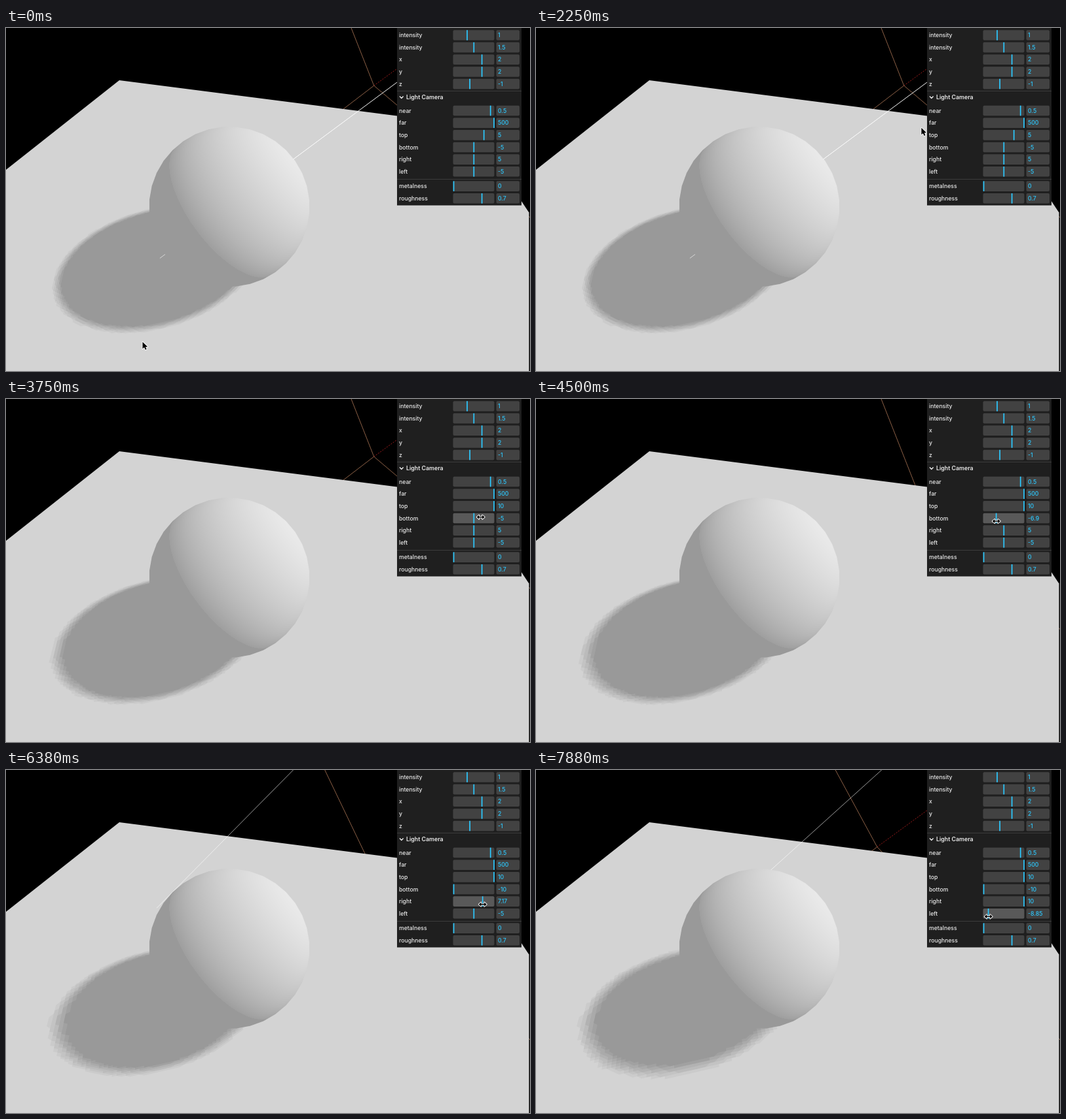
Animation, 800 px wide and 525 px high, one loop 8 s. Source, as an HTML page with a canvas:

```html
<!DOCTYPE html>
<html lang="en">
<head>
<meta charset="utf-8">
<title>Light camera settings</title>
<style>
html, body { margin: 0; width: 100%; height: 100%; overflow: hidden; background: #000; }
canvas { display: block; }
</style>
</head>
<body>
<canvas id="stage" width="800" height="525"></canvas>
<script>
const ctx = document.getElementById('stage').getContext('2d');
const LOOP = 8000, STEP = 125;

// View space: sphere of radius .5 at the origin, camera on +z.
const CX = 341, CY = 273.5, FOCAL = 380, CAM = 1.63, RADIUS = .5, OUTLINE = 122.5;
const light = [.726, .540, .427], right = [-.2, .766, -.609], up = [-.655, .350, .670];
const LIGHT_RISE = .667, UP_RISE = .742; // world heights of the light and up axes
const NEAR = 2.45, LIGHT_DISTANCE = 3, FAR = 500;

const dot = (a, b) => a.reduce((sum, v, i) => sum + v * b[i], 0);
const mix = (a, b, k) => a + (b - a) * k;
const inLight = (r, u, n) => light.map((l, i) => l * n + right[i] * r + up[i] * u);
const project = ([x, y, z]) => {
  const s = FOCAL / (CAM - z);
  return [CX + x * s, CY - y * s];
};
// Distance along the light axis at which the ray (r, u) meets the plane.
const ground = u => -(UP_RISE * u + RADIUS) / LIGHT_RISE;

const settings = [
  ['intensity', 0, 3, 1], ['intensity', 0, 3, 1.5],
  ['x', -5, 5, 2], ['y', -5, 5, 2], ['z', -5, 5, -1],
  ['near', -10, 1.5, .5], ['far', 0, 500, 500], ['top', -10, 10, 5],
  ['bottom', -10, 0, -5], ['right', 0, 10, 5], ['left', -10, 0, -5],
  ['metalness', 0, 1, 0], ['roughness', 0, 1, .7]
];
const rows = settings.map(([label, min, max, value], i) => ({
  label, min, max, value,
  y: 11 + 18.65 * i + (i > 4 ? 22.3 : 0) + (i > 10 ? 3.7 : 0)
}));
const rowOf = label => rows.find(row => row.label === label);
const sliderX = (row, value) => 682.7 + (value - row.min) / (row.max - row.min) * 61.5;

// Each drag eases its value by k ** bend; swing bows the approach to the left.
const drags = [
  { label: 'near', start: 875, end: 1750, to: .5, bend: 1, swing: 0 },
  { label: 'top', start: 2625, end: 3500, to: 10, bend: .75, swing: 150 },
  { label: 'bottom', start: 3875, end: 5000, to: -10, bend: 1.65, swing: 0 },
  { label: 'right', start: 5625, end: 6875, to: 10, bend: 1.63, swing: 35 },
  { label: 'left', start: 7250, end: 7875, to: -8.85, bend: 1, swing: 0 }
];

function valueAt(label, t) {
  const from = rowOf(label).value, d = drags.find(d => d.label === label);
  const k = Math.min(1, Math.max(0, (t - d.start) / (d.end - d.start)));
  return mix(from, d.to, k ** d.bend);
}

function pointerAt(t) {
  let px = 208, py = 480, leave = 125;
  for (const d of drags) {
    const row = rowOf(d.label), y = row.y + 4.5;
    const x = time => sliderX(row, valueAt(d.label, time)) + 1;
    if (t < d.start) {
      const k = Math.max(0, (t - leave) / (d.start - leave));
      return [mix(px, x(d.start), k) - d.swing * Math.sin(Math.PI * k), mix(py, y, k)];
    }
    if (t <= d.end) return [x(t), y];
    [px, py, leave] = [x(d.end), y, d.end];
  }
  return [px, py];
}

function trace(points) {
  ctx.beginPath();
  points.forEach(([x, y]) => ctx.lineTo(x, y));
}
function fill(points, color) {
  trace(points);
  ctx.closePath();
  ctx.fillStyle = color;
  ctx.fill();
}
function stroke(points, color, width = 1, dash = []) {
  trace(points);
  ctx.setLineDash(dash);
  ctx.strokeStyle = color;
  ctx.lineWidth = width;
  ctx.stroke();
  ctx.setLineDash([]);
}
function box(x, y, w, h, color) {
  ctx.beginPath();
  ctx.roundRect(x, y, w, h, 2);
  ctx.fillStyle = color;
  ctx.fill();
}
// Line in view space, clipped in front of the camera.
function line3d(a, b, color, dash) {
  const limit = CAM - .1;
  if (a[2] > limit && b[2] > limit) return;
  const clip = (p, q) => p[2] <= limit ? p :
    p.map((v, i) => mix(v, q[i], (p[2] - limit) / (p[2] - q[2])));
  stroke([project(clip(a, b)), project(clip(b, a))], color, 1, dash);
}

// Diffuse shading of the sphere, computed once.
const SIZE = 250, ballX = Math.round(CX - SIZE / 2), ballY = Math.round(CY - SIZE / 2);
function shadeBall() {
  const ball = document.createElement('canvas');
  ball.width = ball.height = SIZE;
  const b = ball.getContext('2d'), img = b.createImageData(SIZE, SIZE);
  for (let j = 0; j < SIZE; j++) for (let i = 0; i < SIZE; i++) {
    const dx = (ballX + i + .5 - CX) / FOCAL, dy = -(ballY + j + .5 - CY) / FOCAL;
    const a = dx * dx + dy * dy + 1;
    const s = (CAM - Math.sqrt(Math.max(0, CAM ** 2 - a * (CAM ** 2 - RADIUS ** 2)))) / a;
    const n = [dx * s, dy * s, CAM - s];
    const cos = dot(n, light) / Math.hypot(...n);
    const lum = .319 + .498 * (cos > .05 ? cos : 0);
    const grey = 255 * (1.055 * lum ** (1 / 2.4) - .055);
    img.data.set([grey, grey, grey, 255], (j * SIZE + i) * 4);
  }
  b.putImageData(img, 0, 0);
  return ball;
}
const ball = shadeBall();
const outline = Array.from({ length: 36 }, (_, i) => {
  const a = (i + .5) * Math.PI / 18;
  return [CX + OUTLINE * Math.cos(a), CY + OUTLINE * Math.sin(a)];
});

function drawFrustum(v) {
  const corners = [[v.left, v.top], [v.right, v.top], [v.right, v.bottom], [v.left, v.bottom]];
  const source = inLight(0, 0, LIGHT_DISTANCE);
  corners.forEach(([r, u], i) => {
    const near = inLight(r, u, NEAR);
    line3d(near, inLight(...corners[(i + 1) % 4], NEAR), '#8a5f45');
    line3d(near, inLight(r, u, -FAR), '#8a5f45');
    line3d(near, source, '#a01c1c', [2, 2]);
  });
}

// Sphere outline cast on the plane, snapped to shadow-map texels and softened in layers.
function drawShadow(v) {
  const texelR = (v.right - v.left) / 1024, texelU = (v.top - v.bottom) / 1024;
  const snap = (value, texel) => Math.round(value / texel) * texel;
  const layers = 7, samples = 240;
  for (let i = 0; i < layers; i++) {
    const spread = 2 * (1 - 2 * i / (layers - 1));
    const points = Array.from({ length: samples }, (_, s) => {
      const a = s / samples * 2 * Math.PI;
      const r = snap(Math.cos(a) * (RADIUS + spread * texelR), texelR);
      const u = snap(Math.sin(a) * (RADIUS + spread * texelU), texelU);
      return project(inLight(r, u, ground(u)));
    });
    ctx.globalAlpha = 1 / (layers - i);
    fill(points, '#999');
  }
  ctx.globalAlpha = 1;
}

function drawAxis(v, front) {
  const r = (v.right + v.left) / 2, u = (v.top + v.bottom) / 2;
  let from = ground(u);
  if (front) {
    if (r > 0) return;
    if (u < RADIUS) from = Math.sqrt(RADIUS ** 2 - u * u);
  }
  line3d(inLight(r, u, from), inLight(r, u, NEAR), 'rgba(255,255,255,.6)');
}

function drawScene(v) {
  ctx.fillStyle = '#000';
  ctx.fillRect(0, 0, 800, 525);
  drawFrustum(v);
  fill([[173, 80], [710, 149], [798.5, 282.5], [798.5, 525], [0, 525], [0, 217]], '#d3d3d3');
  drawShadow(v);
  drawAxis(v, false);
  ctx.save();
  trace(outline);
  ctx.clip();
  ctx.drawImage(ball, ballX, ballY);
  ctx.restore();
  drawAxis(v, true);
}

function drawPanel(v, hovered) {
  ctx.fillStyle = '#1f1f1f';
  ctx.fillRect(597, 0, 190, 271.5);
  ctx.fillStyle = '#3d3d3d';
  ctx.fillRect(597, 96, 190, 1);
  ctx.fillRect(597, 231, 190, 1);
  ctx.textBaseline = 'middle';
  ctx.fillStyle = '#ebebeb';
  ctx.font = '600 8.8px Inter, sans-serif';
  ctx.fillText('Light Camera', 611, 106.5);
  stroke([[601, 104.5], [603.8, 107.5], [606.6, 104.5]], '#ebebeb', 1.4);
  ctx.font = '500 8.7px Inter, sans-serif';
  for (const row of rows) {
    const value = v[row.label] ?? row.value, top = row.y - 7.8;
    ctx.fillStyle = '#ebebeb';
    ctx.fillText(row.label, 600, row.y + .5);
    box(682.5, top, 63, 15.6, row === hovered ? '#595959' : '#424242');
    box(748.5, top, 35.5, 15.6, '#424242');
    ctx.fillStyle = '#2cc9ff';
    ctx.fillRect(sliderX(row, value), top, 1.7, 15.6);
    ctx.fillText(String(+value.toFixed(2)), 751, row.y + .5);
  }
}

function drawPointer(x, y, resizing) {
  const half = [[-6, 0], [-2.5, -3.2], [-2.5, -.8], [2.5, -.8], [2.5, -3.2]];
  const shape = resizing
    ? [...half, ...half.map(([a, b]) => [-a, -b])]
    : [[.5, .5], [.5, 11], [3, 8.8], [4.8, 12.6], [6.6, 11.8], [5, 8.2], [8.2, 8]];
  const points = shape.map(([a, b]) => [x + a, y + b]);
  ctx.lineJoin = 'round';
  stroke([...points, points[0], points[1]], '#fff', 1.8);
  fill(points, '#000');
}

function draw(now) {
  const t = Math.floor((now % LOOP + 5) / STEP) * STEP % LOOP;
  const v = {};
  for (const { label } of drags) v[label] = valueAt(label, t);
  const [x, y] = pointerAt(t);
  const hovered = x > 682 && x < 754 && rows.find(row => Math.abs(row.y + 4.5 - y) < 7);
  drawScene(v);
  drawPanel(v, hovered);
  drawPointer(x, y, hovered);
}

const start = performance.now();
function frame() {
  draw(performance.now() - start);
  requestAnimationFrame(frame);
}
frame();
</script>
</body>
</html>
```
